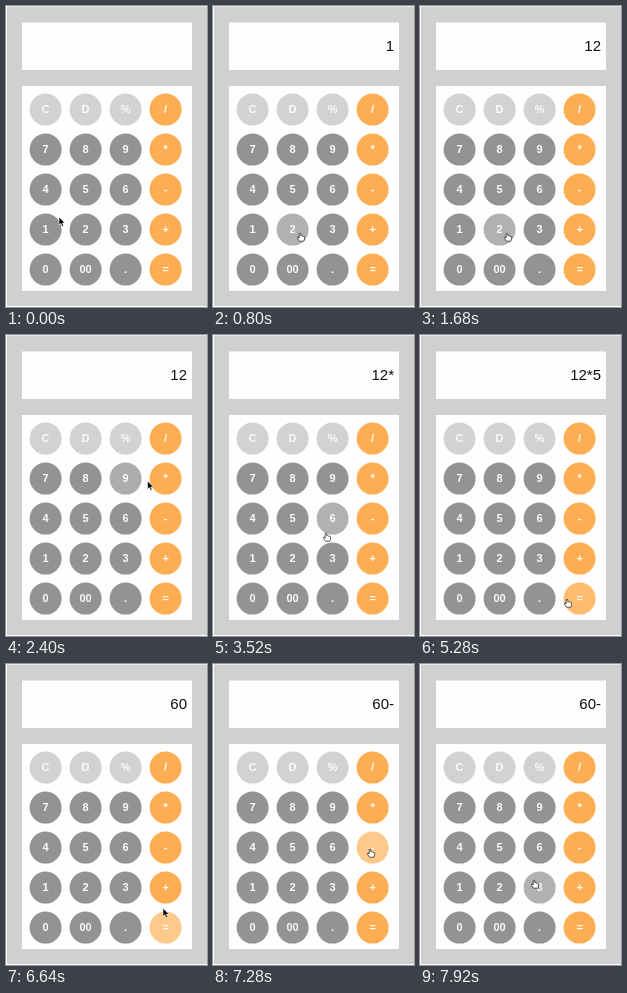
These frames come from a looping animation (201 px wide and 301 px high, 8000 ms). An HTML page:

```html
<!DOCTYPE html>
<html lang="en">
<head>
<meta charset="utf-8">
<title>Calculator</title>
<style>
html, body { margin: 0; width: 100%; height: 100%; overflow: hidden; background: #fff; }
svg { display: block; width: 201px; height: 301px; }
text { font-family: "Liberation Sans", Arial, sans-serif; }
.key text { font-size: 11px; font-weight: bold; fill: #fafafa; text-anchor: middle; }
#out { font-size: 15px; fill: #111; text-anchor: end; }
</style>
</head>
<body>
<svg viewBox="0 0 201 301">
  <rect x="1" y=".5" width="200" height="299.5" fill="#d0d0d0"/>
  <rect x="16" y="16.5" width="170" height="47.5" fill="#fefefe"/>
  <rect x="16" y="80" width="170" height="205" fill="#fefefe"/>
  <text id="out" x="181" y="45"></text>
  <g id="keys"></g>
  <g id="arrow"><path d="M0 0V8.2L1.9 6.5L3.2 9.4L4.6 8.8L3.4 6H6Z" fill="#000" stroke="#fff" stroke-width=".6"/></g>
  <g id="hand"><path transform="scale(.82)" d="M-1 .8Q0 -.6 1 .8V3.4Q2 2.7 2.7 3.7Q3.7 3.2 4.2 4.2Q5.4 3.9 5.6 5V7.2L4.7 10H-.6L-3 6.5Q-3.6 5 -2.4 4.9L-1 6.1Z" fill="#fff" stroke="#222" stroke-width=".9" stroke-linejoin="round"/></g>
</svg>
<script>
const LOOP = 8000, STEP = 80, TICK = 20;
const MOVE = 560, PRESS = 160, FADE = 160;
const $ = id => document.getElementById(id);

// arrival time, pointer tip, display after the press there
const stops = [
  [0, 53, 211],
  [240, 44, 224, "1"],
  [800, 87, 227, "12"],
  [2240, 126, 148],
  [2560, 157, 144, "12*"],
  [3520, 113, 198],
  [3760, 84, 186, "12*5"],
  [5280, 147, 264],
  [5520, 157, 258, "60"],
  [7040, 157, 185, "60-"],
  [7920, 114, 216]
];

// grey or colour at rest, then under the pointer
const tones = {
  light: [[210, 210, 210], [225, 225, 225]],
  dark: [[147, 147, 147], [177, 177, 177]],
  orange: [[254, 174, 82], [255, 201, 139]]
};

function add(parent, tag, attrs) {
  const el = document.createElementNS("http://www.w3.org/2000/svg", tag);
  for (const k in attrs) el.setAttribute(k, attrs[k]);
  return parent.appendChild(el);
}

const rows = ["C D % /", "7 8 9 *", "4 5 6 -", "1 2 3 +", "0 00 . ="];
const keys = rows.flatMap((row, r) => row.split(" ").map((label, c) => {
  const x = 39.6 + 40 * c, y = 103.6 + 40 * r;
  const g = add($("keys"), "g", { class: "key" });
  const disc = add(g, "circle", { cx: x, cy: y, r: 16 });
  add(g, "text", { x, y: y + 3.5 }).textContent = label;
  return { x, y, disc, tone: tones[c === 3 ? "orange" : r ? "dark" : "light"] };
}));

// Rest at each stop, then glide so as to arrive at the next on time
function pointer(t) {
  const next = stops.findIndex(s => s[0] > t);
  if (next < 0) return stops[stops.length - 1].slice(1, 3);
  const [t0, x0, y0] = stops[next - 1], [t1, x1, y1] = stops[next];
  const from = Math.max(t0, t1 - MOVE);
  const p = Math.max(0, (t - from) / (t1 - from));
  const e = (1 - Math.cos(Math.PI * p)) / 2;
  return [x0 + (x1 - x0) * e, y0 + (y1 - y0) * e];
}

function display(t) {
  const done = stops.filter(s => s[3] && s[0] + PRESS <= t).pop();
  return done ? done[3] : "";
}

const inside = (key, [x, y]) => Math.hypot(x - key.x, y - key.y) < 16.5;

// Hover fades linearly in and out, replayed from the recent past
function hover(key, t) {
  let level = 0;
  for (let s = Math.max(0, t - 800); s < t; s += TICK) {
    const d = TICK / FADE;
    level = Math.min(1, Math.max(0, level + (inside(key, pointer(s)) ? d : -d)));
  }
  return level;
}

function draw(t) {
  const pos = pointer(t);
  const over = keys.some(key => inside(key, pos));
  for (const { disc, tone: [a, b], ...key } of keys) {
    const h = hover(key, t);
    disc.setAttribute("fill", `rgb(${a.map((v, i) => Math.round(v + (b[i] - v) * h))})`);
  }
  $("out").textContent = display(t);
  for (const id of ["arrow", "hand"]) {
    $(id).setAttribute("transform", `translate(${pos})`);
    $(id).style.display = (id === "hand") === over ? "" : "none";
  }
}

const start = performance.now();
let last = -1;
function frame() {
  const now = Math.max(0, performance.now() - start) % LOOP;
  const t = Math.floor(now / STEP) * STEP;
  if (t !== last) draw(last = t);
  requestAnimationFrame(frame);
}
frame();
</script>
</body>
</html>
```
